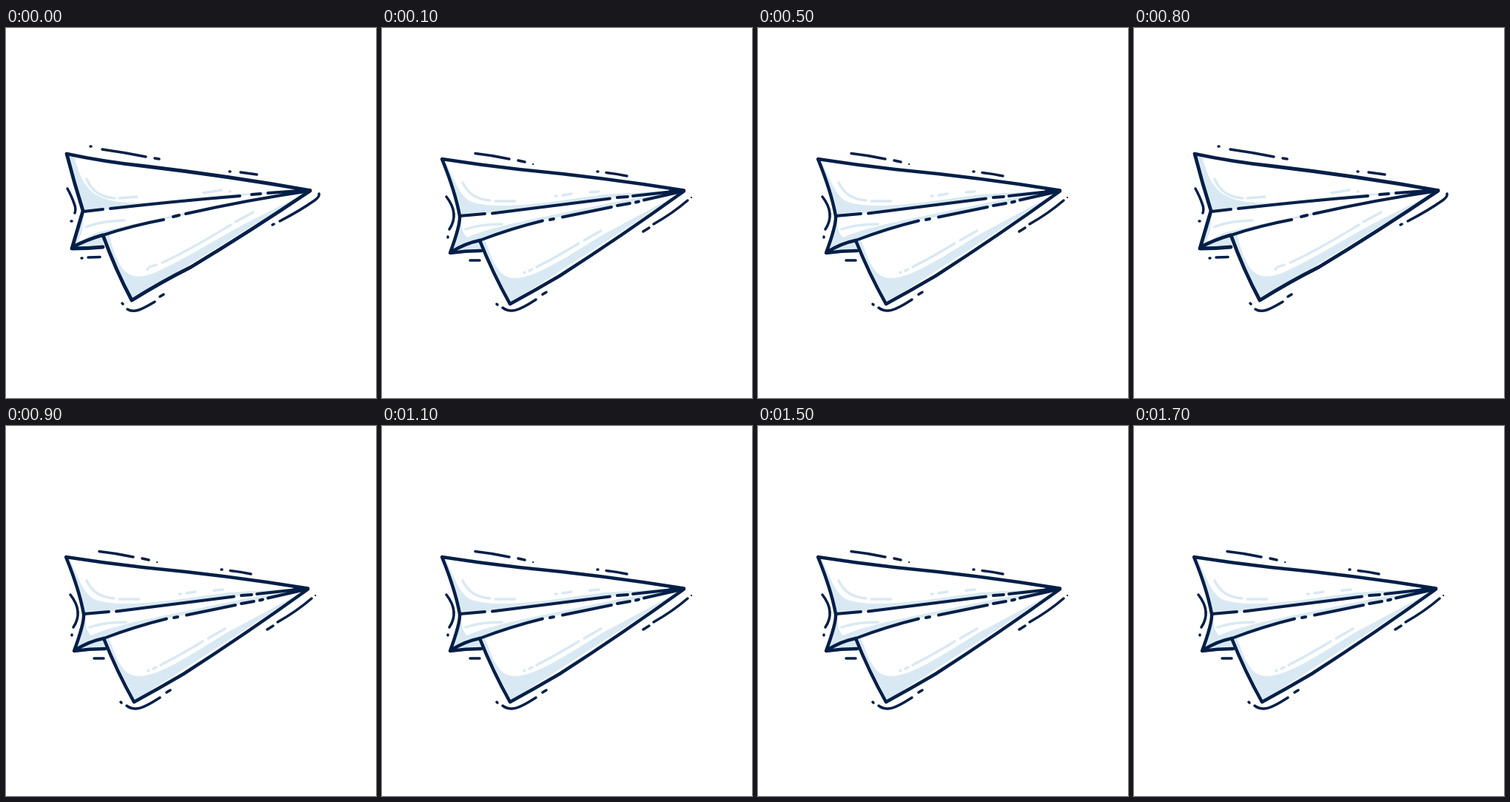
Animation, 500 px wide and 500 px high, one loop 1.8 s. Source, as an HTML page:

```html
<!DOCTYPE html>
<html lang="en">
<head>
<meta charset="utf-8">
<title>Paper plane</title>
<style>
html, body { margin: 0; width: 100%; height: 100%; overflow: hidden; background: #fff; }
svg { display: block; width: 100vw; height: 100vh; }
path { fill: none; stroke: #041f47; stroke-linecap: round; stroke-linejoin: round; }
.shade { fill: #d9e9f3; stroke: none; }
.sheen { stroke: #d9e9f3; stroke-width: 3.4; }
.edge { stroke-width: 4.8; }
.fold { stroke-width: 4; }
.mark { stroke-width: 3.5; }
.soft .edge { stroke-width: 4.5; }
</style>
</head>
<body>
<svg viewBox="0 0 500 500">
  <g class="pose">
    <path class="shade" d="M83 172L105 247L134 245L316 227L405 219L300 225L190 236C150 238 124 232 110 215C99 201 96 186 92 174Z
      M104 250L90 297L131 298L131 281L101 291C108 283 119 276 133 274L212 256L310 235L400 219L330 235L213 259L131 281L97 289C103 278 106 265 104 250Z
      M131 281L169 368L411 220L318 267C270 294 225 321 200 331C180 339 165 337 156 323C147 308 142 292 140 279Z"/>
    <path class="sheen" d="M109 204C116 221 130 229 147 230M153 230L177 228M267 223L291 219M302 221L303 221
      M108 269C125 262 142 261 160 260M191 326L192 325M194 323L203 320M211 317C243 303 274 284 304 266M310 262L334 249"/>
    <path class="edge" d="M104 247Q92 209 82 170Q133 181 190 187Q300 200 411 219.5L392 220
      M104 247L89 298Q111 298 131 296M90 296Q109 286 130 280
      M131 280Q148 327 170 368Q210 343 250 323Q331 274 411 220"/>
    <path class="fold" d="M105 248L131 245M141 244Q230 234 316 227M332 225L344 224M354 223L411 219
      M131 280Q170 267 213 259M226 255L234 253M243 251Q328 232 411 220"/>
    <path class="mark" d="M114 160L115 160M130 164Q159 168 189 174M201 176L207 177M302 194L303 194M317 195L339 198
      M83 217Q89 228 92 237Q95 244 93 250M88 261L89 261M102 311L103 311M111 310L127 309.5
      M157 372L158 373M164 380C173 386 184 380 201 370M208 363L213 360
      M360 266L362 265M370 261Q397 247 417 233Q424 228 423 224"/>
  </g>
  <g class="pose soft">
    <path class="shade" d="M81 179L105 253L141 250L308 230L405 219L300 225L235 234C185 241 140 243 119 234C103 225 97 201 86 181Z
      M105 255L92 304L134 301L133 287L217 260L310 242L405 220L320 234L215 256C180 263 139 272 115 283C108 277 108 266 105 255Z
      M133 288L173 372L407 221L299 279C268 298 240 316 215 328C190 340 171 341 161 331C150 319 145 301 139 286Z"/>
    <path class="sheen" d="M109 209C116 224 129 232 146 233M153 234L180 234M234 227L236 227M244 226L256 224M281 222L293 221
      M113 272C130 266 145 265 162 265M192 331L193 330M199 328L203 326M209 323Q240 307 266 291M273 287L296 274"/>
    <path class="edge" d="M105 254Q99 221 81 177Q132 185 185 191Q300 202 408 219.5L390 220
      M105 254Q106 266 92 304Q113 301 134 301M93 303Q112 291 132 287
      M132 287Q150 332 173 373Q206 355 240 335Q324 281 408 220.5"/>
    <path class="fold" d="M105 254L139 251M149 250.5Q230 240 308 230.5M318 229L332 228M339 227L407 219.5
      M132 287Q174 271 217 260.5M227 259L232 258M244 255.5Q280 248 310 242M318 240L335 237M343 235.5L347 234.5M354 232.5L407 220.5"/>
    <path class="mark" d="M126 169.5Q149 172 172 177M184 179L193 181M291 194L292 194M303 195.5Q317 197 331 200
      M87 228Q105 251 91 272M89 282L89 283M119 314L132 314
      M155 373L156 374M163 378C174 386 185 382 208 367M217 360L222 357
      M353 275L361 270M367 265Q392 251 413 233"/>
    <path d="M204 184L204.2 184M418 229L418.2 229" stroke-width="2.2"/>
  </g>
</svg>
<script>
const STEP = 100;
const poses = document.querySelectorAll('.pose');
poses.forEach((pose, i) => pose.animate(
  [
    { opacity: 1 - i, offset: 0, easing: 'step-end' },
    { opacity: i, offset: 0.5, easing: 'step-end' },
    { opacity: i, offset: 1 }
  ],
  { duration: STEP * poses.length, iterations: Infinity }
));
</script>
</body>
</html>
```
